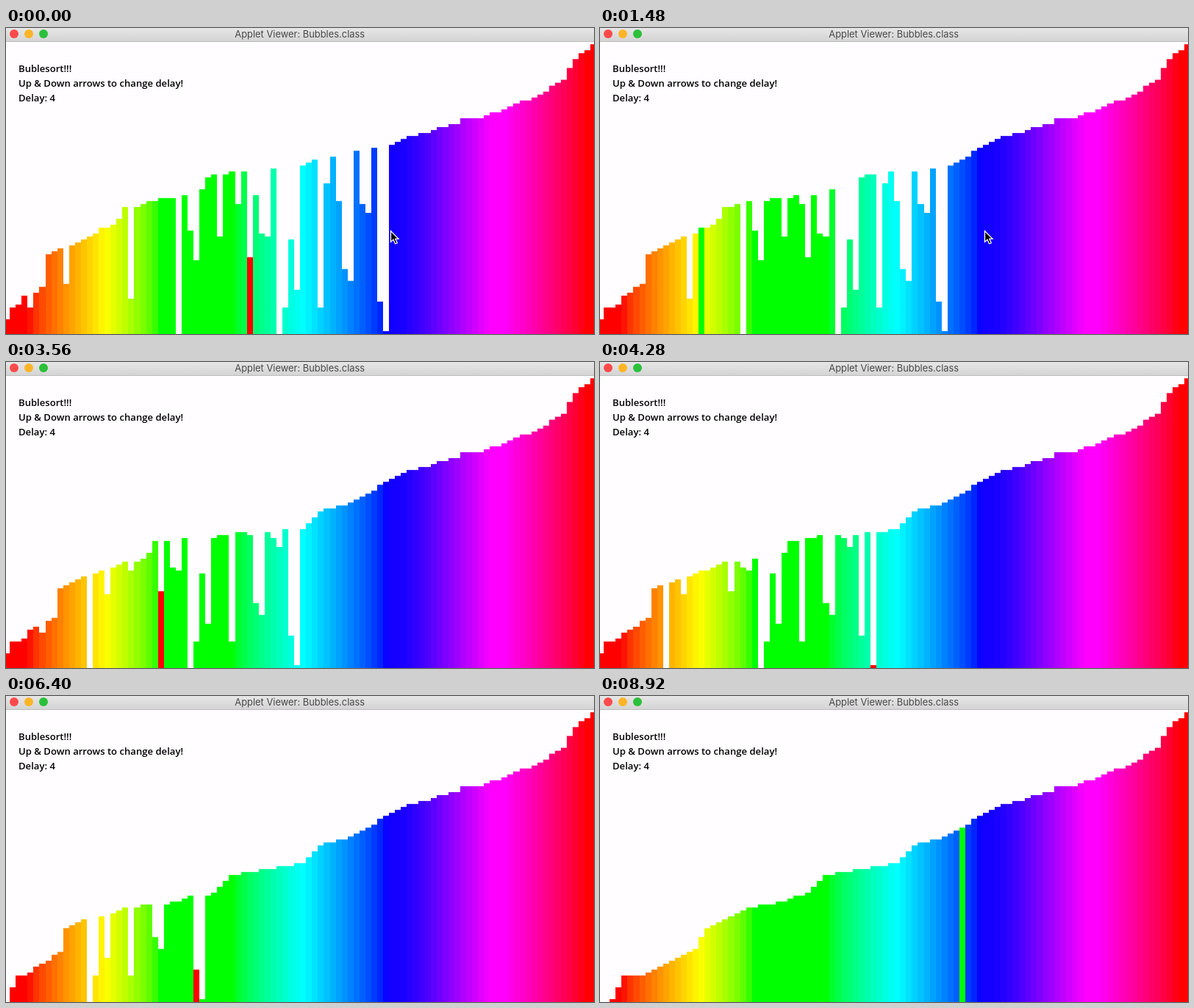
An HTML page with a canvas that plays this animation: 800x417 px, repeating every 8.96 s.

```html
<!DOCTYPE html>
<html>
<head>
<meta charset="utf-8">
<style>
html, body { margin: 0; width: 100%; height: 100%; overflow: hidden; background: #fff; }
canvas { display: block; }
</style>
</head>
<body>
<canvas id="stage" width="800" height="417"></canvas>
<script>
const ctx = document.getElementById('stage').getContext('2d');
const W = 800, H = 417, TICK = 40, LOOP = 8960, COUNT = 100;
const SWAP_COST = 18, POINTER_END = 2500;

// Key points of the sorted profile: [rank, height]
const PROFILE = [
  [0, 0], [1, 0], [2, 1], [4, 9], [7, 9], [16, 18], [18, 25], [25, 32],
  [29, 33], [35, 37], [38, 43], [50, 47], [53, 53], [58, 56], [67, 66],
  [76, 71.4], [77, 73], [80, 73], [90, 81], [94, 86], [96, 93], [99, 98]
];

// Bars still out of order when the loop begins, as position: rank
const STRAYS = {
  4: 7, 10: 15, 21: 10, 29: 0, 31: 32, 32: 18, 36: 28, 39: 40, 41: 19, 42: 50,
  43: 30, 44: 29, 46: 1, 47: 5, 48: 25, 49: 13, 53: 6, 54: 52, 56: 45, 57: 17,
  58: 16, 60: 41, 61: 37, 63: 9, 64: 2
};

// [time in ms, step]; step = pass * COUNT + cursor
const PACE = [[0, 41], [1480, 617], [3560, 1526], [5000, 2300], [6400, 3132], [7480, 4021], [8920, 6161]];

function sortedHeight(rank) {
  const i = Math.max(1, PROFILE.findIndex(p => p[0] >= rank));
  const [r0, h0] = PROFILE[i - 1], [r1, h1] = PROFILE[i];
  return Math.round(h0 + (h1 - h0) * (rank - r0) / (r1 - r0));
}

function startBars() {
  const moved = new Set(Object.values(STRAYS));
  let next = 0;
  return Array.from({ length: COUNT }, (_, pos) => {
    if (pos in STRAYS) return sortedHeight(STRAYS[pos]);
    while (moved.has(next)) next++;
    return sortedHeight(next++);
  });
}

function needsSwap(bars, j) {
  return j > 0 && bars[j] < bars[j - 1];
}

// Compares at the cursor, swaps if needed and returns the time cost
function sortStep(bars, j) {
  if (!needsSwap(bars, j)) return 1;
  [bars[j - 1], bars[j]] = [bars[j], bars[j - 1]];
  return SWAP_COST;
}

// Start time of every step: swaps are slow, plain comparisons are quick
function stepTimes() {
  const bars = startBars(), times = [];
  for (let p = 0; p + 1 < PACE.length; p++) {
    const [t0, from] = PACE[p], [t1, to] = PACE[p + 1];
    const offsets = [];
    let sum = 0;
    for (let s = from; s < to; s++) {
      offsets.push(sum);
      sum += sortStep(bars, s % COUNT);
    }
    offsets.forEach((o, i) => { times[from + i] = t0 + (t1 - t0) * o / sum; });
    times[to] = t1;
  }
  return times;
}

function buildStates() {
  const times = stepTimes(), bars = startBars(), states = [];
  let s = PACE[0][1];
  for (let t = 0; t < LOOP; t += TICK) {
    while (times[s + 1] <= t + 1e-6) sortStep(bars, s++ % COUNT);
    states.push({ bars: bars.slice(), cursor: s % COUNT });
  }
  return states;
}

// Rainbow hue in a wide gamut, clipped to sRGB
function barColor(k) {
  const h = k / COUNT * 6;
  const wave = n => Math.min(1, Math.max(0, Math.abs((h + n) % 6 - 3) - 1));
  const lin = c => c <= 0.04045 ? c / 12.92 : ((c + 0.055) / 1.055) ** 2.4;
  const enc = c => {
    const v = Math.min(1, Math.max(0, c));
    return Math.round(255 * (v <= 0.0031308 ? v * 12.92 : 1.055 * v ** (1 / 2.4) - 0.055));
  };
  const r = lin(wave(0)), g = lin(wave(4)), b = lin(wave(2));
  const out = [
    1.225 * r - 0.225 * g + 0.008 * b,
    1.042 * g - 0.042 * r - 0.022 * b,
    1.098 * b - 0.02 * r - 0.079 * g
  ];
  return `rgb(${out.map(enc).join(',')})`;
}

const colors = Array.from({ length: COUNT }, (_, k) => barColor(k));
const states = buildStates();
const edge = k => Math.ceil(4.65 + 8.0625 * (k - 1));

function drawBars({ bars, cursor }) {
  bars.forEach((v, k) => {
    if (!v) return;
    const x = edge(k), y = H + 0.15 - 4.03 * v;
    ctx.fillStyle = k !== cursor ? colors[k] : needsSwap(bars, k) ? '#f00' : '#0f0';
    ctx.fillRect(x, y, edge(k + 1) - x, H - y);
  });
}

function drawTitleBar() {
  const grad = ctx.createLinearGradient(0, 0, 0, 18);
  grad.addColorStop(0, '#e6e6e6');
  grad.addColorStop(1, '#d4d4d4');
  ctx.fillStyle = grad;
  ctx.fillRect(0, 0, W, 18);
  ctx.fillStyle = '#bdbdbd';
  ctx.fillRect(0, 18, W, 1);
  ['#fc4b4b', '#fdb527', '#2bc03a'].forEach((c, i) => {
    ctx.fillStyle = c;
    ctx.beginPath();
    ctx.arc(11 + 20 * i, 8, 6, 0, 2 * Math.PI);
    ctx.fill();
  });
  ctx.fillStyle = '#484848';
  ctx.font = '12.9px Inter, Roboto, sans-serif';
  ctx.textAlign = 'center';
  ctx.fillText('Applet Viewer: Bubbles.class', 399.7, 13);
}

function drawInfo() {
  ctx.fillStyle = '#000';
  ctx.font = '600 13.1px "Open Sans", "Noto Sans", sans-serif';
  ctx.textAlign = 'left';
  ['Bublesort!!!', 'Up & Down arrows to change delay!', 'Delay: 4']
    .forEach((line, i) => ctx.fillText(line, 17, 60 + 20 * i));
}

function drawPointer() {
  const arrow = new Path2D('M523.5 276.5v15l3.5-3.2 2.5 5.7 2.8-1.2-2.5-5.5h4.2z');
  ctx.fillStyle = '#000';
  ctx.fill(arrow);
  ctx.strokeStyle = '#fff';
  ctx.lineWidth = 1.3;
  ctx.stroke(arrow);
}

function draw(time) {
  const t = time % LOOP;
  ctx.fillStyle = '#fffdff';
  ctx.fillRect(0, 0, W, H);
  drawBars(states[Math.floor(t / TICK)]);
  drawTitleBar();
  drawInfo();
  if (t < POINTER_END) drawPointer();
}

let begin;
function loop(now) {
  if (begin === undefined) begin = now;
  draw(Math.max(0, now - begin));
  requestAnimationFrame(loop);
}
draw(0);
requestAnimationFrame(loop);
</script>
</body>
</html>
```
